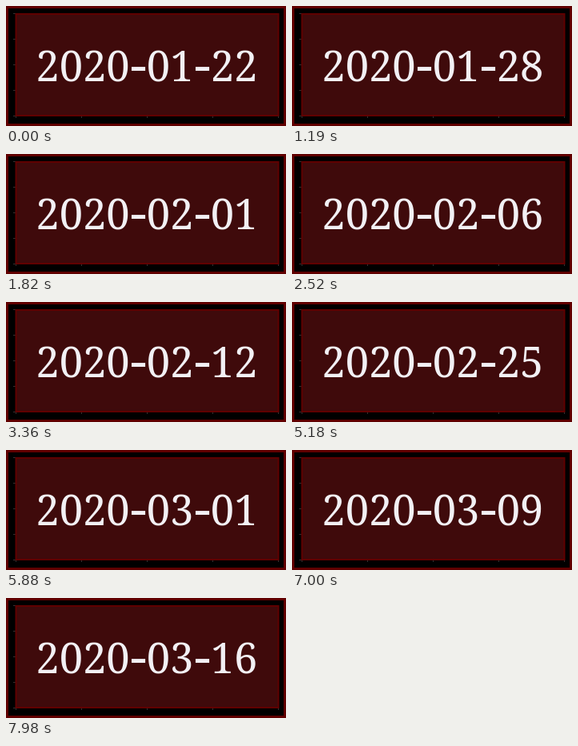
An HTML page that plays this animation: 350x150 px, repeating every 8 s.

```html
<!DOCTYPE html>
<html lang="en">
<head>
<meta charset="utf-8">
<title>Date counter</title>
<style>
  html, body { margin: 0; width: 100%; height: 100%; overflow: hidden; background: #000; }
  svg { display: block; }
  text { font: 52.5px "Noto Serif", serif; fill: #f2f0f4; text-anchor: middle; }
  .dash { font: 66px "Liberation Serif", serif; }
</style>
</head>
<body>
<svg width="350" height="150" viewBox="0 0 350 150">
  <rect x="1.5" y="1.5" width="347" height="147" fill="#000" stroke="#600000" stroke-width="3"/>
  <path d="M9 9.5h3M9 41.5h3M9 73.5h3M9 105.5h3M9 137.5h3M12.5 137v3M94.5 137v3M176.5 137v3M258.5 137v3M340.5 137v3" stroke="#383030"/>
  <rect x="12.5" y="10" width="328" height="127" fill="#3f0a0b" stroke="#600000" stroke-width="2"/>
  <text id="year" x="96" y="94"></text>
  <text class="dash" x="165.5" y="94">-</text>
  <text id="month" x="205" y="94"></text>
  <text class="dash" x="245.5" y="94">-</text>
  <text id="day" x="285" y="94"></text>
</svg>
<script>
const LOOP = 8000;
const fields = ['year', 'month', 'day'].map(id => document.getElementById(id));

// Days counted from the start of January; the pace quickens at 1400 ms.
function dayAt(t) {
  if (t < 1400) return 23 + Math.floor((t - 140) / 210);
  return 29 + Math.floor((t - 1400) / 140);
}

function draw() {
  const date = new Date(Date.UTC(2020, 0, dayAt(performance.now() % LOOP)));
  const parts = date.toISOString().slice(0, 10).split('-');
  fields.forEach((field, i) => { field.textContent = parts[i]; });
  requestAnimationFrame(draw);
}
draw();
</script>
</body>
</html>
```
